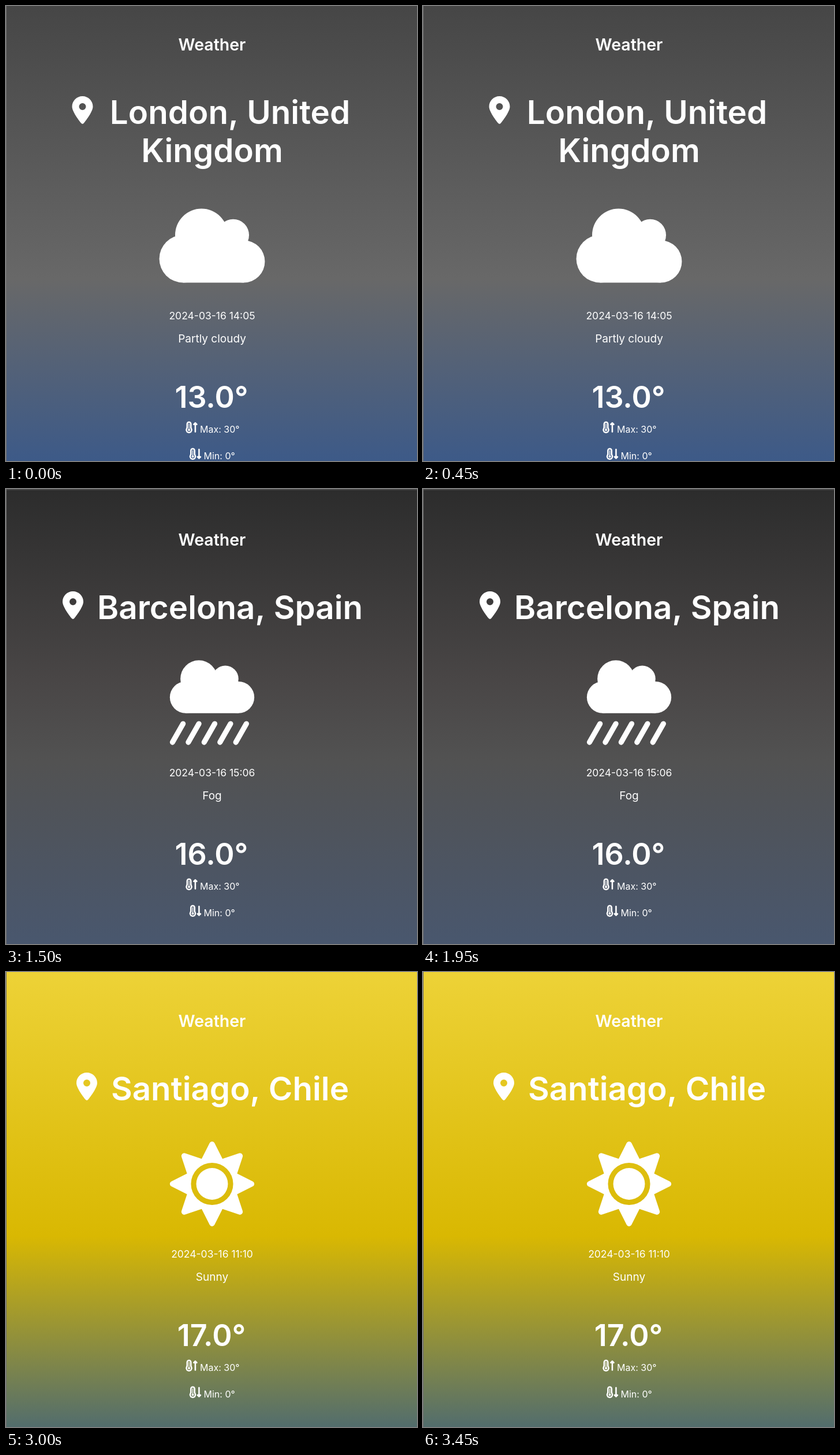
An HTML page with a canvas for the animation above (3.75 s loop, 712x787 px).

```html
<!DOCTYPE html>
<html lang="en">
<head>
<meta charset="utf-8">
<title>Weather</title>
<style>
  html, body { margin: 0; width: 100%; height: 100%; overflow: hidden; background: #444; }
  canvas { display: block; }
</style>
</head>
<body>
<canvas id="stage" width="712" height="787"></canvas>
<script>
const ctx = document.getElementById('stage').getContext('2d');
const W = 712, H = 787, HOLD = 750, TAU = Math.PI * 2;
const LINE = 66, ICON_SCALE = 146.3 / 512;

const cloudySky = [[0, '#464646'], [0.6, '#686868'], [1, '#3d5a88']];
const scenes = [
  { top: 77, pin: 132.5, place: ['London, United', 'Kingdom'], icon: cloud,
    date: '2024-03-16 14:05', sky: cloudySky, text: 'Partly cloudy', temp: '13.0°' },
  { top: 34, pin: 85, place: ['Kabul, Afghanistan'], icon: moon,
    date: '2024-03-16 18:34', text: 'Clear', temp: '8.9°',
    sky: [[0, '#222125'], [0.48, '#3c324b'], [1, '#5f5775']], note: 'Error: No sunrise/sunset' },
  { top: 98, pin: 116, place: ['Barcelona, Spain'], icon: rain,
    date: '2024-03-16 15:06', text: 'Fog', temp: '16.0°',
    sky: [[0, '#2c2c2c'], [0.42, '#494646'], [0.6, '#525252'], [1, '#49576e']], edge: '#484848' },
  { top: 70.5, pin: 86, shift: -1, place: ['Manhattan, United', 'States of America'], icon: cloud,
    date: '2024-03-16 9:06', sky: cloudySky, text: 'Overcast', temp: '3.3°' },
  { top: 95, pin: 140, place: ['Santiago, Chile'], icon: sun,
    date: '2024-03-16 11:10', text: 'Sunny', temp: '17.0°',
    sky: [[0, '#edd237'], [0.58, '#d9b802'], [1, '#526d6d']] }
];

const pinShape = new Path2D('M215.7 499.2C267 435 384 279.4 384 192C384 86 298 0 192 0S0 86 0 192' +
  'c0 87.4 117 243 168.3 307.2c12.3 15.3 35.1 15.3 47.4 0zM192 128a64 64 0 1 1 0 128a64 64 0 1 1 0-128z');
const moonShape = new Path2D('M283.2 512c79 0 151.1-35.9 198.9-94.8c7-8.7-.7-21.4-11.6-19.3' +
  'c-124.2 23.6-238.3-71.6-238.3-197c0-72.2 38.7-138.6 101.5-174.4c9.7-5.5 7.3-20.2-3.7-22.2' +
  'A258 258 0 0 0 283.2 0a256 256 0 0 0 0 512z');

function label(str, x, y, size, weight = 400, align = 'center') {
  ctx.font = `${weight} ${size}px Inter, sans-serif`;
  ctx.textAlign = align;
  ctx.fillText(str, x, y);
}

function disc(x, y, r) {
  ctx.beginPath();
  ctx.arc(x, y, r, 0, TAU);
  ctx.fill();
}

function bar(x1, y1, x2, y2, width) {
  ctx.lineWidth = width;
  ctx.beginPath();
  ctx.moveTo(x1, y1);
  ctx.lineTo(x2, y2);
  ctx.stroke();
}

function placed(x, y, scale, draw) {
  ctx.save();
  ctx.translate(x, y);
  ctx.scale(scale, scale);
  draw();
  ctx.restore();
}

function cut(draw) {
  ctx.globalCompositeOperation = 'destination-out';
  draw();
  ctx.globalCompositeOperation = 'source-over';
}

// Weather icons use a grid of 512 units centred on the origin.
function cloud() {
  disc(-176, 80, 144);
  disc(-64, -64, 160);
  disc(128, -64, 96);
  disc(192, 96, 128);
  ctx.fillRect(-176, -56, 368, 280);
}

function rain() {
  disc(-160, -32, 96);
  disc(-80, -144, 112);
  disc(80, -144, 80);
  disc(160, -32, 96);
  ctx.fillRect(-160, -128, 320, 192);
  for (let i = 0; i < 5; i++) bar(-240 + 96 * i, 240, -176 + 96 * i, 128, 32);
}

function moon() {
  ctx.translate(-256, -256);
  ctx.fill(moonShape);
}

function sun() {
  ctx.beginPath();
  for (let i = 0; i < 16; i++) {
    const r = i % 2 ? 142 : 239, a = i * TAU / 16;
    ctx.lineTo(r * Math.cos(a), r * Math.sin(a));
  }
  ctx.closePath();
  ctx.lineWidth = 34;
  ctx.fill();
  ctx.stroke();
  cut(() => disc(0, 0, 128));
  disc(0, 0, 96);
}

function thermometer(up) {
  const tube = (width, bulb) => {
    bar(176, 112, 176, 368, width);
    disc(176, 368, bulb);
  };
  tube(224, 144);
  cut(() => tube(96, 80));
  tube(32, 48);

  if (!up) {
    ctx.translate(0, 512);
    ctx.scale(1, -1);
  }
  bar(448, 128, 448, 448, 64);
  ctx.beginPath();
  ctx.moveTo(448, 64);
  ctx.lineTo(512, 128);
  ctx.lineTo(384, 128);
  ctx.closePath();
  ctx.fill();
  ctx.stroke();
}

function limit(str, x, y, up) {
  placed(x, y - 19.5, 0.04, () => thermometer(up));
  label(str, x + 26, y, 16, 400, 'left');
}

function paintSky({ sky, edge }) {
  ctx.globalCompositeOperation = 'destination-over';
  if (edge) {
    ctx.fillStyle = edge;
    ctx.fillRect(1, 0, W, 2);
  }
  ctx.fillStyle = '#707070';
  ctx.fillRect(0, 0, 1, H);
  const fill = ctx.createLinearGradient(0, 0, 0, H);
  sky.forEach(([at, color]) => fill.addColorStop(at, color));
  ctx.fillStyle = fill;
  ctx.fillRect(0, 0, W, H);
  ctx.globalCompositeOperation = 'source-over';
}

function render(scene) {
  const { top, place, shift = 0 } = scene;
  const cx = 357 + shift;
  const base = top + 399 + LINE * (place.length - 1);

  ctx.clearRect(0, 0, W, H);
  ctx.fillStyle = ctx.strokeStyle = '#fff';
  ctx.lineCap = ctx.lineJoin = 'round';

  label('Weather', cx, top, 28.5, 600);
  placed(scene.pin - 18, top + 79, 48 / 512, () => ctx.fill(pinShape, 'evenodd'));
  place.forEach((str, i) => label(str, i ? cx : cx + 31, top + 127 + LINE * i, 56.5, 600));
  placed(cx, base - 127.5, ICON_SCALE, scene.icon);
  label(scene.date, cx, base, 17.5);
  label(scene.text, cx, base + 40, 19);
  label(scene.temp, cx - 1, base + 153, 52, 600);
  limit('Max: 30°', cx - 47, base + 196, true);
  limit('Min: 0°', cx - 40.5, base + 242, false);
  if (scene.note) label(scene.note, cx, base + 340, 31, 500);
  paintSky(scene);
}

let shown = -1;
function tick(now) {
  const index = Math.floor(now / HOLD) % scenes.length;
  if (index !== shown) render(scenes[shown = index]);
  requestAnimationFrame(tick);
}
requestAnimationFrame(tick);
</script>
</body>
</html>
```
